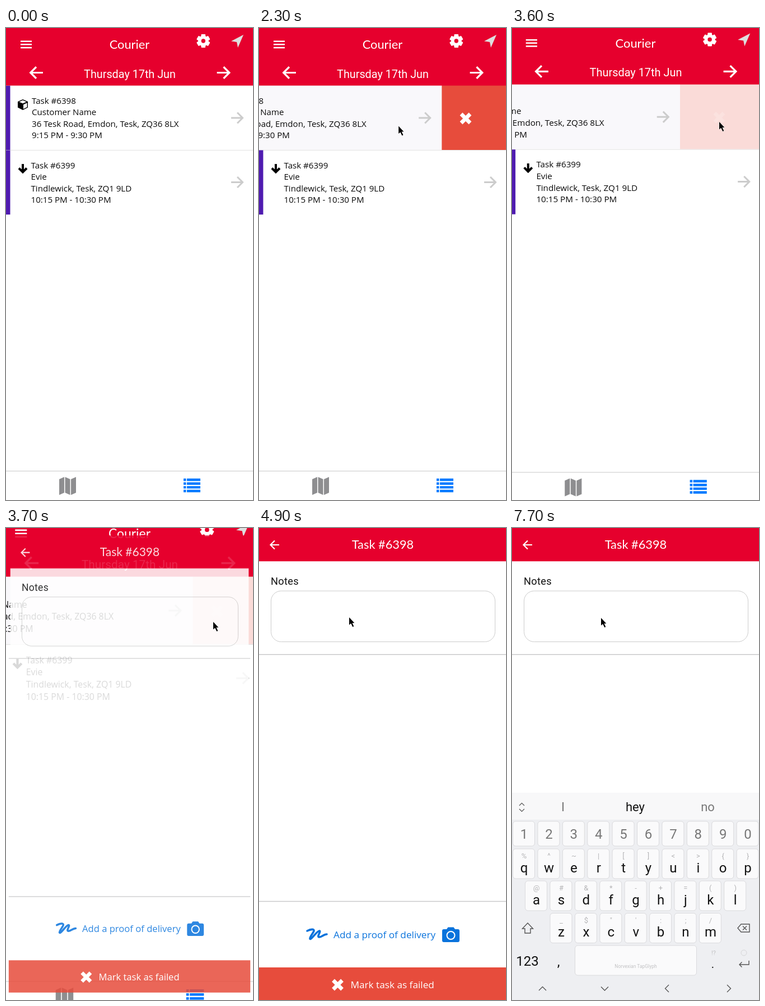
These frames come from a looping animation (441x840 px, 8000 ms). An HTML page:

```html
<!DOCTYPE html>
<html lang="en">
<head>
<meta charset="utf-8">
<title>Courier tasks</title>
<style>
html, body { margin: 0; width: 100%; height: 100%; overflow: hidden; background: #fff; }
svg { display: block; width: 100vw; height: 100vh; }
text { white-space: pre; }
.title { font: 21.8px Lato, sans-serif; fill: #fff; text-anchor: middle; }
.date { font: 19.8px Roboto, sans-serif; fill: #fff; text-anchor: middle; }
.task { font: 15.1px "Open Sans", sans-serif; fill: #0a0a0a; }
.action { font: 17.2px "Open Sans", sans-serif; }
.keys { font: 24px Roboto, sans-serif; fill: #111; text-anchor: middle; }
.hint { font-size: 13px; fill: #b4b4b6; }
.line { fill: none; stroke-width: 3; }
.screen { transform-origin: 220.5px 420px; }
</style>
</head>
<body>
<svg viewBox="0 0 441 840">
  <defs>
    <path id="arrow" class="line" d="M-11 0H9M0 -9.5L9.5 0L0 9.5"/>
    <path id="cross" d="M-8 -8L8 8M8 -8L-8 8" stroke="#fff" stroke-width="6.8"/>
    <path id="bar" d="M0 0H7.500V114.500H0Z" fill="#4f1bb0"/>
  </defs>

  <g id="list" class="screen">
    <rect width="441" height="840" fill="#fff"/>
    <g id="tile">
      <rect id="tileBox" y="102" height="115" fill="#e74c3c"/>
      <use href="#cross" x="369" y="161"/>
    </g>
    <g id="row">
      <rect id="rowBox" y="102" width="443" height="115"/>
      <use href="#bar" y="102.500"/>
      <path d="M30 127L39 131V141.500L30 146L21 141.500V131Z"/>
      <path d="M30 128.500L36.500 131.500L30 134.300L23.500 131.500ZM31 136.200L37.600 133.300V140.700L31 144Z" fill="#fff"/>
      <text class="task"><tspan x="46" y="134.500">Task #6398</tspan><tspan x="46" dy="20.500">Customer Name</tspan><tspan x="46" dy="20.500">36 Tesk Road, Emdon, Tesk, ZQ36 8LX</tspan><tspan x="46" dy="20.500">9:15 PM - 9:30 PM</tspan></text>
      <use href="#arrow" x="413" y="160" stroke="#ccc"/>
    </g>
    <path d="M0 217.500H441" stroke="#e3e3e3"/>
    <use href="#bar" y="217.500"/>
    <path d="M30 242V256M23 249.500L30 256.500L37 249.500" fill="none" stroke="#000" stroke-width="4"/>
    <text class="task"><tspan x="44.500" y="249.500">Task #6399</tspan><tspan x="44.500" dy="20.500">Evie</tspan><tspan x="44.500" dy="20.500">Tindlewick, Tesk, ZQ1 9LD</tspan><tspan x="44.500" dy="20.500">10:15 PM - 10:30 PM</tspan></text>
    <use href="#arrow" x="413" y="274.500" stroke="#ccc"/>

    <rect width="441" height="102.500" fill="#e6002d"/>
    <path d="M26 23.700H46M26 29.300H46M26 35H46" stroke="#fff" stroke-width="2.500"/>
    <text class="title" x="220.500" y="37">Courier</text>
    <g id="gear" transform="translate(352.300 23)" fill="#fff"></g>
    <path d="M424 12L402 23.500L412 25L414 35Z" fill="#dedede"/>
    <use href="#arrow" transform="translate(54 79.500) scale(-1.080 1.080)" stroke="#fff"/>
    <use href="#arrow" transform="translate(388.500 79.500) scale(1.080)" stroke="#fff"/>
    <text class="date" x="221" y="88.500">Thursday 17th Jun</text>

    <path d="M0 788.500H441" stroke="#c9c9c9"/>
    <path d="M95 803L104 799V827L95 831ZM105.500 799L114.500 803V831L105.500 827ZM116 803L125 799V827L116 831Z" fill="#8e8e90"/>
    <path d="M317 804H321.500M323 804H347M317 810.700H321.500M323 810.700H347M317 817.400H321.500M323 817.400H347M317 824H321.500M323 824H347" stroke="#007aff" stroke-width="4.400"/>
  </g>

  <g id="detail" class="screen">
    <rect width="441" height="840" fill="#fff"/>
    <rect x="-3" width="447" height="60" fill="#e6002d" opacity=".25"/>
    <rect x="-3" y="-1.500" width="447" height="60.500" fill="#e6002d"/>
    <path d="M36 30H21M28 22.500L20.500 30L28 37.500" fill="none" stroke="#fff" stroke-width="2.200"/>
    <text class="title" x="221" y="37">Task #6398</text>
    <text x="21" y="101" font-family="Roboto, sans-serif" font-size="18.2" letter-spacing=".3" fill="#111">Notes</text>
    <rect x="21.500" y="112" width="400" height="90.500" rx="18" fill="none" stroke="#ccc"/>
    <path id="caret" d="M38 146V167" stroke="#0b9060" stroke-width="2"/>
    <path d="M-3 225.300H444M-3 664.500H444" stroke="#c9c9cb" stroke-width="1.500"/>
    <path d="M86 717C92 714 99 713 98 717C97 721 90 728 91 731C93 734 104 716 108 717C111 718 103 727 107 728C111 729 115 723 121 723" fill="none" stroke="#0a73dc" stroke-width="3.600" stroke-linecap="round"/>
    <text class="action" x="133" y="730" fill="#0a73dc">Add a proof of delivery</text>
    <path d="M330 714H335L337.500 710.500H347.500L350 714H355Q358 714 358 717V734Q358 737 355 737H330Q327 737 327 734V717Q327 714 330 714Z" fill="#0a73dc"/>
    <circle cx="342.500" cy="725" r="7" fill="none" stroke="#fff" stroke-width="2"/>
    <rect x="-3" y="782" width="447" height="59.500" fill="#e74c3c"/>
    <use href="#cross" x="140.500" y="813"/>
    <text class="action" x="163.500" y="818.500" fill="#fff">Mark task as failed</text>
  </g>

  <g id="board" class="keys"></g>
  <path id="pointer" d="M0 0V13.500L3.200 10.800L6.200 17L8.300 16L5.500 10H9.300Z" stroke="#fff" stroke-width=".8" paint-order="stroke"/>
</svg>
<script>
const $ = id => document.getElementById(id);
const LOOP = 8000, STEP = 100;

// Linear value along [time, value] points
function track(t, points) {
  const i = points.findIndex(p => p[0] > t);
  if (i < 0) return points.at(-1)[1];
  if (i === 0) return points[0][1];
  const [t0, a] = points[i - 1], [t1, b] = points[i];
  return a + (b - a) * (t - t0) / (t1 - t0);
}

function buildGear() {
  let html = '<circle r="9.4"/>';
  for (let a = 0; a < 360; a += 60)
    html += `<rect x="-3.8" y="-12" width="7.6" height="6" rx="1.2" transform="rotate(${a})"/>`;
  $('gear').innerHTML = html + '<circle r="3.7" fill="#e6002d"/>';
}

function buildBoard() {
  const esc = s => s.replace('&', '&amp;').replace('<', '&lt;');
  const key = (x, y, w, h) =>
    `<rect x="${x}" y="${y}" width="${w}" height="${h}" rx="5" fill="#fafafb" stroke="#dadadd"/>`;
  const label = (x, y, s, extra = '') => `<text x="${x}" y="${y}" ${extra}>${esc(s)}</text>`;
  const icon = (d, w = 1.4, color = '#555') =>
    `<path d="${d}" fill="none" stroke="${color}" stroke-width="${w}"/>`;
  const pitch = 44.4;
  let html = '<rect y="471" width="441" height="369" fill="#eeeff2"/>' +
    '<rect y="471" width="441" height="48" fill="#f8f8f9"/>' +
    icon('M13 494L17.500 489.500L22 494M13 500L17.500 504.500L22 500', 1.2) +
    label(91, 504, 'I', 'style="font-size:22px" fill="#777"') +
    label(220, 504, 'hey', 'style="font-size:22px"') +
    label(349.5, 504, 'no', 'style="font-size:22px" fill="#777"');

  [...'1234567890'].forEach((c, i) => {
    const x = 1.5 + i * pitch;
    html += key(x, 522, 39, 44) + label(x + 20, 553, c, 'fill="#777"');
  });
  const rows = [
    [1.5, 571, 'qwertyuiop', '%^~|[]<>{}'],
    [23.5, 628, 'asdfghjkl', '@#&*-+=()'],
    [68, 685.5, 'zxcvbnm', '_$"\':;/']
  ];
  for (const [left, y, letters, hints] of rows)
    [...letters].forEach((c, i) => {
      const x = left + i * pitch;
      html += key(x, y, 39, 53) + label(x + 20, y + 41.5, c) +
        label(x + 20, y + 17, hints[i], 'class="hint"');
    });

  html += icon('M28 703L37.500 713H33V721H23V713H18.500Z') +
    icon('M409 705H424V719H409L403 712ZM412 708.500L419 715.500M419 708.500L412 715.500') +
    label(27.5, 779, '123') + label(83, 780, ',') +
    key(112.5, 743, 217, 53) +
    label(221, 783, 'Norvexian TapGlyph', 'style="font-size:8.5px" fill="#c2c2c4"') +
    label(358.5, 783, '.', 'style="font-size:20px"') +
    label(360, 760, '!?', 'style="font-size:11px" fill="#c2c2c4"') +
    '<circle cx="414" cy="756" r="5" fill="none" stroke="#d6d6d8"/>' +
    icon('M423 770V777H406M410.500 772.500L406 777L410.500 781.500') +
    icon('M48 823L54.500 816.500L61 823M159 816.500L165.500 823L172 816.500M280 813L273.500 819.500L280 826M384 813L390.500 819.500L384 826');
  $('board').innerHTML = html;
}

const pointerX = [[200, 398], [600, 240], [1000, 344], [1200, 356], [1400, 356], [1700, 366], [1900, 366],
  [2400, 220], [2500, 220], [2900, 394], [3400, 370], [3800, 370], [4300, 176], [4500, 176], [4900, 161], [5100, 161], [5400, 159]];
const pointerY = [[200, 34], [600, 214], [1000, 164], [1200, 165], [1400, 165], [1700, 173], [1900, 173],
  [2400, 175], [2900, 182], [3400, 167], [3800, 167], [4300, 146], [4500, 146], [4900, 159], [5100, 159], [5400, 160]];
const swipe = [[1900, 0], [2400, -146], [2600, -148], [3500, -148], [3600, -143.5], [3700, -115]];
const press = [[3200, 1], [3400, .2]];
const listScale = [[3500, 1], [3600, 1.0063], [3700, 1.05]];
const detailScale = [[3600, .88], [3700, .965], [3800, .9945], [3900, .999], [4000, 1]];
const detailFade = [[3600, 0], [3700, .85], [3800, 1]];
const boardDrop = [[6700, 369], [6800, 250], [6900, 90], [7000, 25], [7100, 0]];

function show(id, on) { $(id).style.display = on ? '' : 'none'; }

function draw(t) {
  const shift = track(t, swipe);
  show('list', t < 3800);
  $('list').style.transform = `scale(${track(t, listScale)})`;
  $('row').setAttribute('transform', `translate(${shift} 0)`);
  $('rowBox').setAttribute('fill', shift ? '#f9f8fb' : '#fff');
  $('tileBox').setAttribute('x', 443 + shift);
  $('tileBox').setAttribute('width', Math.max(0, -2 - shift));
  $('tile').style.fillOpacity = $('tile').style.strokeOpacity = track(t, press);
  show('tile', shift < -2);

  show('detail', t > 3600);
  $('detail').style.transform = `scale(${track(t, detailScale)})`;
  $('detail').style.opacity = track(t, detailFade);
  show('caret', t >= 6200 && t < 6800 || t >= 7200 && t < 7700);

  show('board', t >= 6800);
  $('board').setAttribute('transform', `translate(0 ${track(t, boardDrop)})`);

  show('pointer', t >= 200);
  $('pointer').setAttribute('transform', `translate(${track(t, pointerX)} ${track(t, pointerY)})`);
}

buildGear();
buildBoard();
const start = performance.now();
function tick() {
  draw(Math.floor((performance.now() - start) % LOOP / STEP) * STEP);
  requestAnimationFrame(tick);
}
tick();
</script>
</body>
</html>
```
